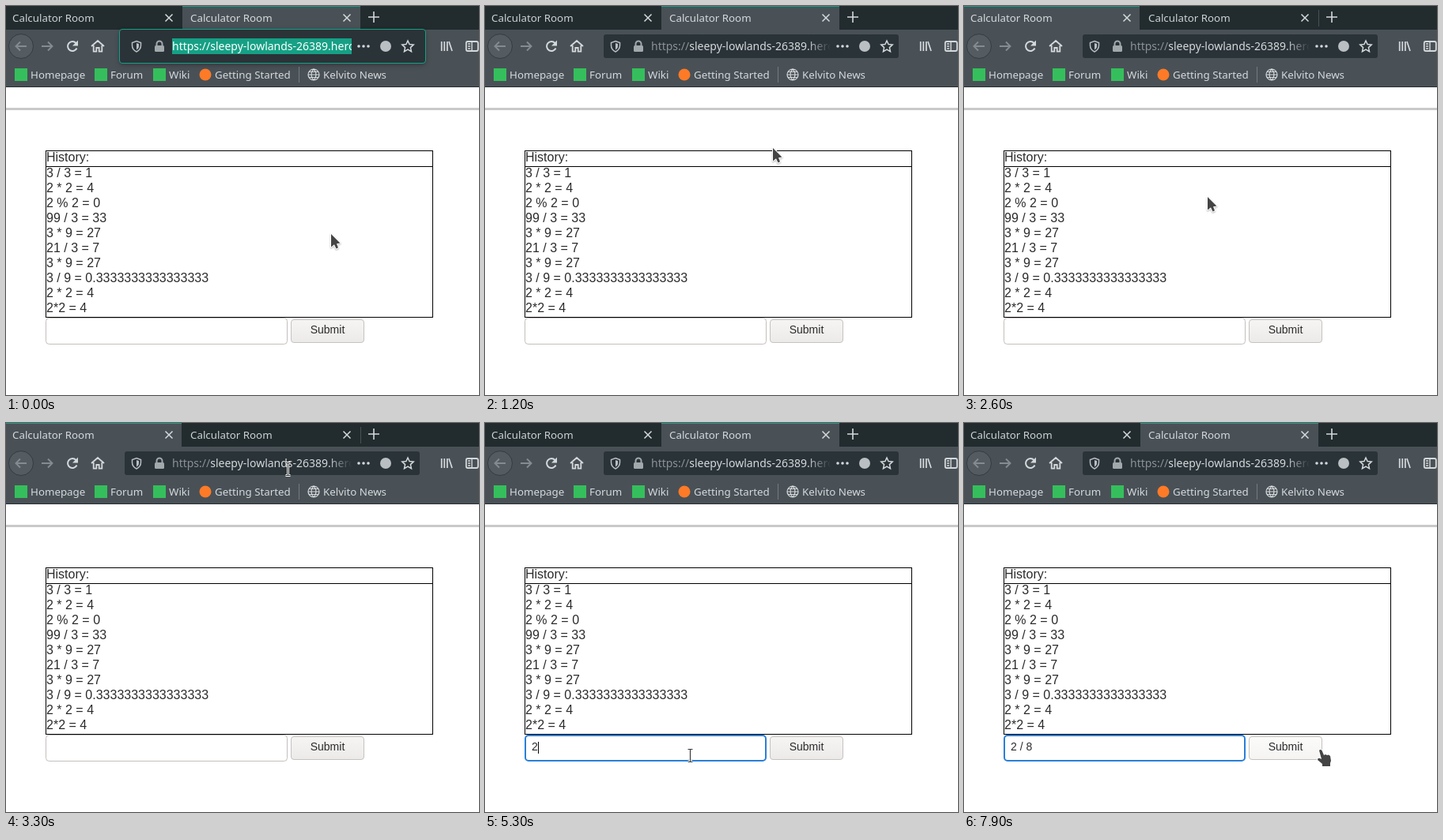
Animation of 598 by 493 pixels, one loop 8000 ms. Source, as an HTML page with a canvas:

```html
<!DOCTYPE html>
<html lang="en">
<head>
<meta charset="utf-8">
<title>Calculator Room</title>
<style>
html, body { margin: 0; width: 100%; height: 100%; overflow: hidden; background: #fff; }
canvas { display: block; width: 598px; height: 493px; }
</style>
</head>
<body>
<canvas id="stage" width="598" height="493"></canvas>
<script>
const ctx = document.getElementById('stage').getContext('2d');
const LOOP = 8000, STEP = 100;
const UI = '"Noto Sans", sans-serif';
const PAGE = '"Liberation Sans", Arial, sans-serif';
const TEAL = '#16a085', LIGHT = '#d5d9dc', DIM = '#858c91', BAR = '#495157', DARK = '#222b2e';

const history = ['3 / 3 = 1', '2 * 2 = 4', '2 % 2 = 0', '99 / 3 = 33', '3 * 9 = 27',
  '21 / 3 = 7', '3 * 9 = 27', '3 / 9 = 0.3333333333333333', '2 * 2 = 4', '2*2 = 4'];

// time, x, y of the pointer's hot spot
const path = [
  [0, 411, 289], [300, 404, 325], [500, 396, 340], [600, 393, 337], [900, 372, 268],
  [1200, 364, 180], [1500, 190, 48], [1700, 108, 13], [1800, 105, 11], [1900, 130, 36],
  [2000, 240, 140], [2100, 300, 214], [2500, 300, 214], [2900, 330, 327], [3100, 345, 240],
  [3300, 356, 58], [3400, 357, 22], [3600, 352, 15], [3800, 352, 14], [3900, 300, 200],
  [4000, 258, 355], [4200, 256, 420], [4400, 258, 430], [4600, 259, 421], [7500, 259, 421],
  [7600, 290, 418], [7700, 390, 414], [7800, 462, 412], [7900, 452, 414]
];
const typed = [[5300, '2'], [5500, '2 '], [5800, '2 /'], [6000, '2 / '], [6400, '2 / 8']];

const within = (t, a, b) => t >= a && t < b;
const inBox = (p, x, y, w, h) => p.x >= x && p.x < x + w && p.y >= y && p.y < y + h;

function pointerAt(t) {
  const i = path.findIndex(k => k[0] > t);
  if (i < 0) { const k = path[path.length - 1]; return { x: k[1], y: k[2] }; }
  const a = path[i - 1], b = path[i], u = (t - a[0]) / (b[0] - a[0]);
  return { x: Math.round(a[1] + (b[1] - a[1]) * u), y: Math.round(a[2] + (b[2] - a[2]) * u) };
}

function rect(x, y, w, h, fill) { ctx.fillStyle = fill; ctx.fillRect(x, y, w, h); }

function round(x, y, w, h, r, fill, stroke, line = 1) {
  ctx.beginPath();
  ctx.roundRect(x, y, w, h, r);
  if (fill) { ctx.fillStyle = fill; ctx.fill(); }
  if (stroke) { ctx.strokeStyle = stroke; ctx.lineWidth = line; ctx.stroke(); }
}

function disc(x, y, r, fill) {
  ctx.beginPath();
  ctx.arc(x, y, r, 0, 7);
  ctx.fillStyle = fill;
  ctx.fill();
}

function text(s, x, y, size, family, color, align = 'left') {
  ctx.font = size + 'px ' + family;
  ctx.fillStyle = color;
  ctx.textAlign = align;
  ctx.fillText(s, x, y);
}

// path data drawn around (x, y)
function icon(x, y, d, stroke, line, fill) {
  ctx.save();
  ctx.translate(x, y);
  const p = new Path2D(d);
  if (stroke) { ctx.strokeStyle = stroke; ctx.lineWidth = line; ctx.stroke(p); }
  if (fill) { ctx.fillStyle = fill; ctx.fill(p); }
  ctx.restore();
}

function drawTabs(active, p) {
  rect(0, 0, 598, 31, DARK);
  [[0, 222], [223, 225]].forEach(([x, w], i) => {
    const on = i === active;
    if (on) {
      rect(x, 0, w, 31, BAR);
      rect(x, 0, w, 1, TEAL);
    } else if (inBox(p, x, 0, w, 30)) {
      rect(x, 0, w, 30, '#30393d');
    }
    text('Calculator Room', x ? 233 : 8, 20, 13.333, UI, on ? LIGHT : '#cdd2d5');
    icon(x ? 431 : 206, 15, 'M-4.5-4.5L4.5 4.5M4.5-4.5L-4.5 4.5', LIGHT, 1.5);
  });
  if (active === 0) rect(448, 5, 1, 21, '#485155');
  icon(465, 14, 'M-7 0H7M0-7V7', LIGHT, 1.6);
}

function drawUrl(focus) {
  if (focus) {
    ctx.save();
    ctx.shadowColor = 'rgba(0,0,0,.35)';
    ctx.shadowBlur = 6;
    ctx.shadowOffsetY = 2;
    round(143.5, 29.5, 387, 43, 3.5, '#2a3338');
    ctx.restore();
    round(143.5, 29.5, 387, 43, 3.5, null, TEAL);
  } else {
    round(150, 36, 373, 30, 3, '#2a3338');
  }

  const host = 'sleepy-lowlands-26389.herokuapp.com';
  ctx.save();
  ctx.beginPath();
  ctx.rect(210, 36, 227, 30);
  ctx.clip();
  if (focus) {
    rect(210, 41, 227, 20, TEAL);
    text('https://' + host, 210, 56, 14, UI, '#fff');
  } else {
    text('https://', 210, 56, 14, UI, '#8b9296');
    text(host, 210 + ctx.measureText('https://').width, 56, 14, UI, LIGHT);
    const fade = ctx.createLinearGradient(407, 0, 437, 0);
    fade.addColorStop(0, 'rgba(42,51,56,0)');
    fade.addColorStop(1, '#2a3338');
    rect(407, 36, 30, 30, fade);
  }
  ctx.restore();

  const soft = '#b9bfc3';
  icon(165, 51, 'M0-6.5L5.5-4.5V-1C5.5 3 3 5.5 0 7C-3 5.5-5.5 3-5.5-1V-4.5Z', soft, 1.5);
  icon(165, 51, 'M0-4L3-3V0C3 2 2 3.3 0 4.5Z', null, 0, soft);
  icon(194, 51, 'M-3.5 0V-3A3.5 3.5 0 0 1 3.5-3V0', '#a2a9ad', 2);
  round(188, 50, 12, 8, 1.5, '#a2a9ad');
  [446, 452, 458].forEach(x => disc(x, 51, 1.8, LIGHT));
  disc(480, 51, 7, soft);
  icon(508, 51, 'M0-7L2.1-2.4L7.2-1.9L3.4 1.6L4.5 6.7L0 4L-4.5 6.7L-3.4 1.6L-7.2-1.9L-2.1-2.4Z', LIGHT, 1.5);
}

function drawToolbar(focus) {
  rect(0, 30, 598, 72, BAR);
  rect(0, 102, 598, 1, '#262e32');

  const arrow = 'M7 0H-6M-1-5.5L-6.5 0L-1 5.5';
  disc(19, 51, 15.5, '#545c61');
  ctx.beginPath();
  ctx.arc(19, 51, 15.5, 0, 7);
  ctx.strokeStyle = '#343c41';
  ctx.lineWidth = 1;
  ctx.stroke();
  icon(19, 51, arrow, DIM, 1.9);
  ctx.save();
  ctx.translate(52, 51);
  ctx.scale(-1, 1);
  icon(0, 0, arrow, DIM, 1.9);
  ctx.restore();
  icon(84, 51, 'M5.5 2.5A6 6 0 1 1 4.5-4', LIGHT, 2);
  icon(84, 51, 'M7-7.5V-.5H0Z', null, 0, LIGHT);
  icon(116, 51, 'M-8 0L0-7L8 0M-5.3-1V6.7H-1.7V2H1.7V6.7H5.3V-1', LIGHT, 1.8);
  drawUrl(focus);
  icon(557, 51, 'M-6.3-6V6M-2.7-6V6M.9-6V6M3-6L7 6', LIGHT, 1.7);
  round(581.8, 45, 15, 12, 2, null, LIGHT, 1.8);
  icon(589, 51, 'M0-6V6M-5-3H-2M-5 0H-2M-5 3H-2', LIGHT, 1.4);

  [[11, 'Homepage'], [112, 'Forum'], [186, 'Wiki']].forEach(([x, s]) => {
    rect(x, 79, 16, 16, '#35bf5c');
    text(s, x + 20, 92, 13.333, UI, LIGHT);
  });
  disc(252, 87, 7.5, '#ff7a26');
  text('Getting Started', 264, 92, 13.333, UI, LIGHT);
  rect(370, 77, 1, 20, '#737a7f');
  icon(389, 87, 'M-7 0A7 7 0 1 1 7 0A7 7 0 1 1-7 0M-7 0H7M-6-3.5H6M-6 3.5H6M0-7C-4-3-4 3 0 7C4 3 4-3 0-7', LIGHT, 1.2);
  text('Kelvito News', 401, 92, 13.333, UI, LIGHT);
}

function drawPage(t, p) {
  rect(0, 129, 598, 3, '#c9c9c9');
  ctx.strokeStyle = '#000';
  ctx.lineWidth = 1;
  ctx.strokeRect(50.5, 183.5, 489, 211);
  rect(51, 203, 488, 1, '#000');
  text('History:', 51, 197, 16, PAGE, '#2b2b2b');
  history.forEach((s, i) => text(s, 51, 217 + 19 * i, 16, PAGE, '#2b2b2b'));

  const focus = t >= 4500;
  if (focus) round(51, 396, 304, 32, 4, '#fff', '#2a7fd8', 2);
  else round(50.5, 395.5, 305, 33, 4, '#fff', '#c3bfbb');
  const now = typed.filter(k => k[0] <= t).pop();
  const value = now ? now[1] : '';
  text(value, 59, 415, 14, PAGE, '#2b2b2b');
  if (within(t, 4500, 7000)) rect(Math.round(59 + ctx.measureText(value).width), 404, 1, 15, '#000');

  const over = inBox(p, 360, 397, 93, 30);
  const face = ctx.createLinearGradient(0, 397, 0, 427);
  face.addColorStop(0, over ? '#fbfbfa' : '#f6f5f4');
  face.addColorStop(1, over ? '#f5f4f3' : '#eceae9');
  round(360.5, 397.5, 92, 29, 3.5, face, '#c6c2be');
  text('Submit', 406.5, 415, 14, PAGE, '#2b2b2b', 'center');
}

function drawPointer(p) {
  const { x, y } = p;
  const overText = inBox(p, 204, 36, 236, 30) || inBox(p, 50, 396, 306, 36) || inBox(p, 50, 204, 212, 190);
  ctx.lineJoin = 'round';
  if (overText) {
    const d = 'M-2.5-8H3.5M.5-8V8M-2.5 8H3.5';
    icon(x, y + .5, d, '#fff', 3);
    icon(x, y + .5, d, '#3a3a3a', 1.2);
  } else if (inBox(p, 360, 397, 105, 30)) {
    const d = 'M-3 0Q-1.5-2 .5 0L3 6L5 5L7 6L9 5.5L11 7L12 13L11 16V20H1V17L-5 12Q-5 9-2 10L0 11Z';
    icon(x, y + 1, d, '#fff', 2);
    icon(x, y + 1, d, null, 0, '#454545');
  } else {
    const d = 'M0 0V16.5L4 13.2L6.5 18.5L9 17.3L7 12.2L11.5 11.5Z';
    ctx.save();
    ctx.shadowColor = 'rgba(0,0,0,.3)';
    ctx.shadowBlur = 2;
    ctx.shadowOffsetY = 1;
    icon(x, y, d, '#fff', 2);
    ctx.restore();
    icon(x, y, d, null, 0, '#444');
  }
  ctx.lineJoin = 'miter';
}

function draw(t) {
  const p = pointerAt(t);
  const active = within(t, 1700, 3600) ? 0 : 1;
  const urlFocus = t < 600 || within(t, 1700, 2300);
  rect(0, 0, 598, 493, '#fff');
  drawTabs(active, p);
  drawToolbar(urlFocus);
  drawPage(t, p);
  drawPointer(p);
}

function tick() {
  const t = performance.now() % LOOP;
  draw(Math.floor(t / STEP) * STEP);
  requestAnimationFrame(tick);
}
tick();
</script>
</body>
</html>
```
